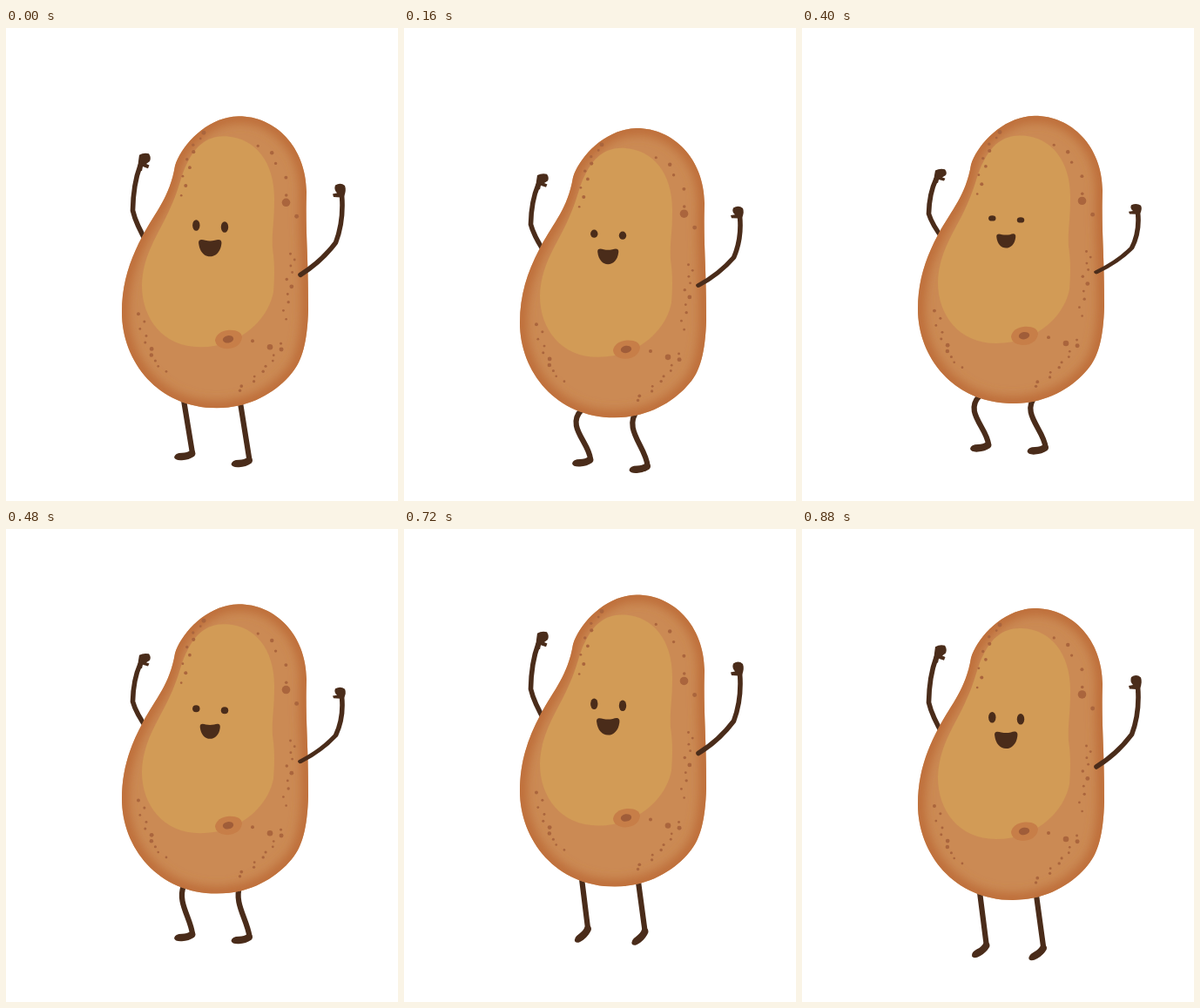
An HTML page that plays this animation: 450 by 543 pixels, repeating every 0.96 s.

```html
<!DOCTYPE html>
<html lang="en">
<head>
<meta charset="utf-8">
<title>Dancing potato</title>
<style>
  html, body { margin: 0; width: 100%; height: 100%; overflow: hidden; background: #fff; }
  svg { display: block; width: 450px; height: 543px; }
  .line { fill: none; stroke: #4a2c1a; stroke-width: 5.6; stroke-linecap: round; stroke-linejoin: round; }
  #legs .line { stroke-width: 6.2; }
  .dark { fill: #4a2c1a; }
  #speckles { fill: #aa653d; }
</style>
</head>
<body>
<svg viewBox="0 0 450 543">
  <defs>
    <path id="shape" d="M267 103C309 103 344.500 138 345 190C343.500 235 347 260 347 325C346 362 340 384 328 398C310 420 280 438 242 438C175 438 133 385 133 328C133 295 142 268 157 240C172 212 188 196 194 160C201 137 230 104 267 103Z"/>
    <clipPath id="inside"><use href="#shape"/></clipPath>
    <filter id="soft"><feGaussianBlur stdDeviation="6"/></filter>
    <path id="foot" class="dark" d="M-2 -3L2 -3Q5 1 2 4Q-4 8 -12 8.500Q-20 9 -21 5Q-20 0 -12 0Q-6 0 -2 -3Z"/>
  </defs>

  <g id="legs">
    <path class="line"/><use href="#foot"/>
    <path class="line"/><use href="#foot"/>
  </g>
  <g id="armL">
    <path class="line" d="M163 250Q149 227 145.500 212Q146 183 154 162"/>
    <path class="dark" d="M152 157L153 150Q158 147 164 148.500Q167 153 165 157L161 160L164.500 161.500L163 165L157 163L156 168L151 166Z"/>
  </g>

  <g id="body">
    <use href="#shape" fill="#cb8a54"/>
    <g clip-path="url(#inside)">
      <use href="#shape" fill="none" stroke="#bd6c39" stroke-width="15" filter="url(#soft)"/>
    </g>
    <path fill="#d29b56" d="M250 126C285 126 309 155 308 200C308 225 305 235 306 255C309 275 308 290 307 305C300 340 265 368 223 368C180 368 156 335 156 297C157 262 174 240 187 212C200 185 200 172 208 157C217 138 230 126 250 126Z"/>
    <path fill="#c77e48" d="M240 360Q242 350 256 348.500Q270 348 271 357Q269 369 254 370Q241 369 240 360Z"/>
    <ellipse cx="255" cy="359" rx="6.200" ry="4.200" fill="#a05d39" transform="rotate(-10 255 359)"/>
    <g id="speckles"></g>
  </g>

  <g id="face" class="dark">
    <ellipse class="eye" cx="218.300" cy="0" rx="4.200"/>
    <ellipse class="eye" cx="251" cy="2" rx="4.200"/>
    <path id="mouth" d="M-12 -5C-12.500 -10 -8 -9 -5 -8Q0 -7 5 -8C9 -9.500 13 -9.500 12 -4C11 4 6 9 0 9S-11 4 -12 -5Z"/>
  </g>
  <g id="armR">
    <path class="line" d="M338 285Q362 270 378.500 248Q388 223 385.500 193"/>
    <path class="dark" d="M378 182Q384 178 389 182.500Q391 188 388 195L388 200L383 200L384 196L376 195.500L375 192L380 191Q376 187 378 182Z"/>
  </g>
</svg>
<script>
const $ = id => document.getElementById(id);
const LOOP = 960, STEP = 80, TOP = 103, HEIGHT = 335;

let seed = 7;
const random = () => (seed = seed * 16807 % 2147483647) / 2147483647;
const speckle = (x, y, r) => `<circle cx="${x}" cy="${y}" r="${r}"/>`;

// Speckles scattered along a curve from (x0, y0) to (x1, y1), bent towards (cx, cy)
function trail(count, x0, y0, cx, cy, x1, y1) {
  const bend = (a, b, c, u) => a * (1 - u) ** 2 + 2 * b * u * (1 - u) + c * u * u;
  return Array.from({ length: count }, (_, i) => {
    const u = i / (count - 1), side = i % 2 ? 1 : -1;
    return speckle(bend(x0, cx, x1, u) + side * 4 * random(), bend(y0, cy, y1, u), 1.3 + 1.4 * random() ** 2);
  }).join('');
}
$('speckles').innerHTML =
  trail(9, 227, 122, 206, 147, 204, 194) +
  trail(6, 292, 137, 317, 152, 330, 218) +
  trail(10, 328, 261, 328, 290, 318, 336) +
  trail(10, 317, 364, 302, 395, 266, 418) +
  trail(10, 154, 330, 158, 370, 180, 396) +
  speckle(321.5, 202, 4.8) + speckle(303, 368, 3.3) + speckle(283, 361, 2);

// Eases 0 to 1 between two times
function ramp(t, from, to) {
  const u = Math.min(1, Math.max(0, (t - from) / (to - from)));
  return (1 - Math.cos(Math.PI * u)) / 2;
}

// Rises from a to b and falls from c to d, once per loop
function pulse(t, a, b, c, d) {
  const local = (t - a + LOOP) % LOOP;
  return ramp(local, 0, b - a) - ramp(local, c - a, d - a);
}

const place = (el, transform) => el.setAttribute('transform', transform);

function draw(t) {
  const lift = pulse(t, 255, 610, 660, 1160);
  const crouch = pulse(t, -20, 340, 340, 720);
  const bend = -22 * pulse(t, 0, 160, 400, 560);
  const point = pulse(t, 480, 720, 840, 970);
  const ankleY = 495 - 39 * pulse(t, 240, 590, 660, 1080);
  const rightDrop = 3 + 5 * pulse(t, -90, 0, 120, 300);

  const top = 115.7 - 41.7 * lift;
  const height = HEIGHT - 5.5 * pulse(t, 0, 320, 320, 640);
  const squash = height / HEIGHT;
  const bodyY = y => top + (y - TOP) * squash;
  place($('body'), `translate(0 ${top}) scale(1 ${squash}) translate(0 ${-TOP})`);

  const arm = (id, shoulder, stretch) =>
    place($(id), `translate(0 ${bodyY(shoulder)}) scale(1 ${stretch}) translate(0 ${-shoulder})`);
  arm('armL', 240, 1.03 - .24 * crouch);
  arm('armR', 285, 1 - .27 * crouch);

  place($('face'), `translate(0 ${bodyY(226) + 2.3 - 6.3 * crouch})`);
  document.querySelectorAll('.eye').forEach(eye => eye.setAttribute('ry', 6.3 - 3.3 * crouch));
  place($('mouth'), `translate(234.200 26) scale(${1.09 - .19 * crouch})`);

  const parts = $('legs').children;
  const leg = (n, hipX, x, y) => {
    const hipY = top + height - 9, dx = (x - hipX) / 3, dy = (y - hipY) / 3;
    parts[n].setAttribute('d',
      `M${hipX} ${hipY}C${hipX + dx + bend} ${hipY + dy} ${x - dx - bend / 10} ${y - dy} ${x} ${y}`);
    place(parts[n + 1], `translate(${x} ${y}) rotate(${-34 * point})`);
  };
  const ankleX = 214 - 3 * point;
  leg(0, 204, ankleX, ankleY);
  leg(2, 268.5, ankleX + 65.5, ankleY + rightDrop);
}

function tick() {
  draw(Math.floor(performance.now() % LOOP / STEP) * STEP);
  requestAnimationFrame(tick);
}
tick();
</script>
</body>
</html>
```
